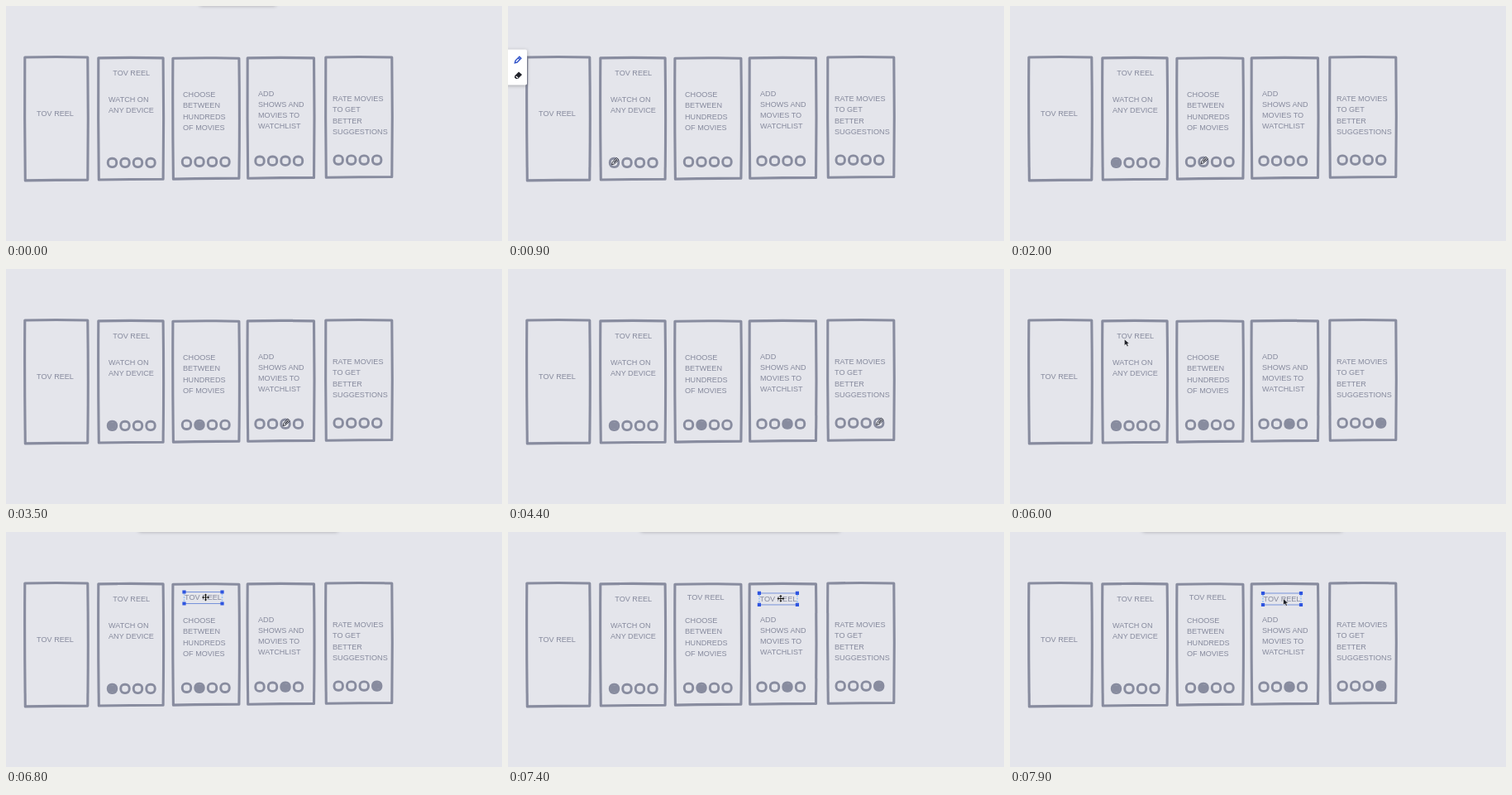
Animation of 600 by 284 pixels, one loop 8000 ms. Source, as an HTML page:

```html
<!DOCTYPE html>
<html lang="en">
<head>
<meta charset="utf-8">
<title>Wireframe sketching</title>
<style>
  html, body { margin: 0; width: 100%; height: 100%; overflow: hidden; background: #e4e5eb; }
  svg { display: block; width: 100%; height: 100%; }
  text { font: 9.1px "Liberation Sans", Arial, sans-serif; fill: #868a9d; }
  .ink { fill: none; stroke: #888c9f; stroke-linecap: round; stroke-linejoin: round; }
  .panel { fill: #fff; filter: drop-shadow(0 1px 2px #0004); }
</style>
</head>
<body>
<svg viewBox="0 0 600 284">
  <g id="board"></g>
  <text id="copy" text-anchor="middle"></text>
  <text id="dragged" text-anchor="middle"></text>
  <g id="selection">
    <path d="M-23-7H23M-23 7H23" stroke="#5a7bd6" stroke-width=".8"/>
    <path d="M-23-5V5M23-5V5" stroke="#9cc4f5" stroke-width="1.6" stroke-dasharray="2 1.5"/>
    <path d="M-23-7H23.01M-23 7H23.01" stroke="#2f55e0" stroke-width="4.2" stroke-dasharray="0 46" stroke-linecap="square"/>
  </g>
  <rect id="toolbar" class="panel" y="-14" height="13" rx="3"/>
  <g id="tools">
    <rect class="panel" x="-4" y="52.5" width="27" height="43" rx="2"/>
    <path d="M8.3 68.8l.7-2.7 4.8-4.8 2 2-4.8 4.8zM12.4 62.7l2 2" fill="none" stroke="#2d50c8" stroke-width="1.4"/>
    <path d="M8 84.5l5-5 4 3.4-5 5H9.6L8 86.3z" fill="#20222a"/>
    <path d="M9.6 84.9l2.4 2.1" stroke="#fff" stroke-width="1.3"/>
  </g>
  <g id="pen">
    <path d="M-4 4.4l.8-3.2 5-5.2 2.6 2.4-5.2 5z" fill="#eceef3" stroke="#30323d"/>
    <path d="M-1.5 2l4-4.2" stroke="#30323d" stroke-width="1.3"/>
  </g>
  <path id="arrow" d="M0 0V8L2 6.3 3.4 9 5 8.2 3.7 5.6H6.3z" fill="#20222a" stroke="#fff" stroke-width=".6"/>
  <g id="move">
    <path d="M-3.5 0H3.5M0-3.5V3.5" stroke="#fff" stroke-width="2.4"/>
    <path d="M-3.5 0H3.5M0-3.5V3.5" stroke="#111" stroke-width="1.1"/>
    <path d="M0-4.4l1.7 2h-3.4zM0 4.4l1.7-2h-3.4zM-4.4 0l2-1.7v3.4zM4.4 0l-2-1.7v3.4z" fill="#111"/>
  </g>
</svg>
<script>
const BRAND = 'TOV REEL', LOOP = 8000, STEP = 100;
const LINE = 13.1, BASELINE = 3.3, DOT_GAP = 15.5;
const $ = id => document.getElementById(id);

function add(tag, attrs, content = '') {
  const el = document.createElementNS('http://www.w3.org/2000/svg', tag);
  for (const key in attrs) el.setAttribute(key, attrs[key]);
  el.textContent = content;
  return $('board').appendChild(el);
}

const label = (x, y, str, anchor = 'start') =>
  add('text', { x, y: y + BASELINE, 'text-anchor': anchor }, str);

// left edge and width of each screen; text starts at tx and its first line is centred on ty
const screens = [
  { x: 22.8, w: 76 },
  { x: 111.8, w: 78.3, tx: 124, ty: 112.5, dots: 128.5, lines: ['WATCH ON', 'ANY DEVICE'] },
  { x: 201.9, w: 80, tx: 214, ty: 107, dots: 218.5, lines: ['CHOOSE', 'BETWEEN', 'HUNDREDS', 'OF MOVIES'] },
  { x: 292.2, w: 80.3, tx: 305, ty: 105.4, dots: 307, lines: ['ADD', 'SHOWS AND', 'MOVIES TO', 'WATCHLIST'] },
  { x: 386.8, w: 80, tx: 395, ty: 112, dots: 402.2, lines: ['RATE MOVIES', 'TO GET', 'BETTER', 'SUGGESTIONS'] }
];

function outline(x, y, w, bottom) {
  const h = bottom - y;
  add('path', {
    d: `M${x} ${y}q${w / 2}-1 ${w} 0q1 ${h / 2} 0 ${h - .8}q${-w / 2} 0 ${.5 - w} .8q-1 ${-h / 2}-.5 ${-h}z`,
    class: 'ink', 'stroke-width': 3.1
  });
}

const marks = [];
screens.forEach(({ x, w, tx, ty, dots, lines = [] }, i) => {
  outline(x, 62 + 1.2 * Math.sin(i * Math.PI / 4), w, 210.9 - .9 * i);
  lines.forEach((line, n) => label(tx, ty + n * LINE, line));
  if (!dots) return;
  const y = 190.5 - 1.1 * i;
  for (let n = 0; n < 4; n++) {
    add('rect', { x: dots + n * DOT_GAP - 5.2, y: y - 5.2, width: 10.4, height: 10.4, rx: 4.5,
      class: 'ink', 'stroke-width': 2.9 });
  }
  const cx = dots + (i - 1) * DOT_GAP;
  const path = add('path', { d: `M${cx - 3} ${y - 3}` + 'l6 1-6 1'.repeat(3),
    class: 'ink', 'stroke-width': 3, pathLength: 1, 'stroke-dasharray': '1 2' });
  marks.push({ path, spot: [cx + 1, y - 2] });
});

const titles = [[151.7, 81], [239.2, 79], [329, 80.5]];
label(59.5, 130, BRAND, 'middle');
label(...titles[0], BRAND, 'middle');

const progress = (t, start, length) => Math.min(1, Math.max(0, (t - start) / length));
const smooth = k => k * k * (3 - 2 * k);
const easeOut = k => 1 - (1 - k) ** 3;
const mix = (a, b, k) => a.map((v, i) => v + (b[i] - v) * k);

// the pen reaches a new dot every 1200 ms, rests, then scribbles it full
const arrival = i => 800 + 1200 * i;
const filled = (t, i) => progress(t, arrival(i) + 300, 300);

function penAt(t) {
  let at = [12, 70];
  marks.forEach(({ spot }, i) => {
    at = mix(at, spot, smooth(progress(t, arrival(i) - 400, 400)));
    const k = filled(t, i);
    if (k > 0 && k < 1) at = [at[0] + 2 * Math.sin(k * 19), at[1] + 4 * k - 2];
  });
  return mix(at, [10, 111], progress(t, 5000, 300));
}

const dragAt = t => mix(
  mix(titles[0], titles[1], easeOut(progress(t, 6400, 500))),
  titles[2], easeOut(progress(t, 6900, 700)));

const show = (id, on) => { $(id).style.display = on ? '' : 'none'; };
function place(id, on, [x, y]) {
  show(id, on);
  $(id).setAttribute('transform', `translate(${x} ${y})`);
}

function draw(t) {
  const selected = t >= 6200, dragging = t >= 6500, settled = t >= 7600;

  marks.forEach(({ path }, i) => {
    const k = filled(t, i);
    path.style.display = k ? '' : 'none';
    path.setAttribute('stroke-dashoffset', 1 - k);
  });
  place('pen', t >= 400 && t < 5400, penAt(t));
  show('tools', t >= 400 && t < 1100);

  show('toolbar', t < 200 || selected);
  $('toolbar').setAttribute('x', selected ? 160 : 234);
  $('toolbar').setAttribute('width', selected ? 242 : 93);

  const [x, y] = dragAt(t);
  const pointer = mix([3, 108], [154, 82], smooth(progress(t, 5600, 500)));
  place('selection', selected, [x, y + .5]);
  place('dragged', dragging, [x, y + BASELINE]);
  place('copy', t >= 7000, [titles[1][0], titles[1][1] + BASELINE]);
  place('move', dragging && !settled, [x + 3, y]);
  place('arrow', (t >= 5600 && !dragging) || settled, settled ? [x + 1.5, y] : pointer);
}

$('copy').textContent = $('dragged').textContent = BRAND;

const began = performance.now();
function tick() {
  const t = (performance.now() - began) % LOOP;
  draw(Math.floor(t / STEP) * STEP);
  requestAnimationFrame(tick);
}
tick();
</script>
</body>
</html>
```
